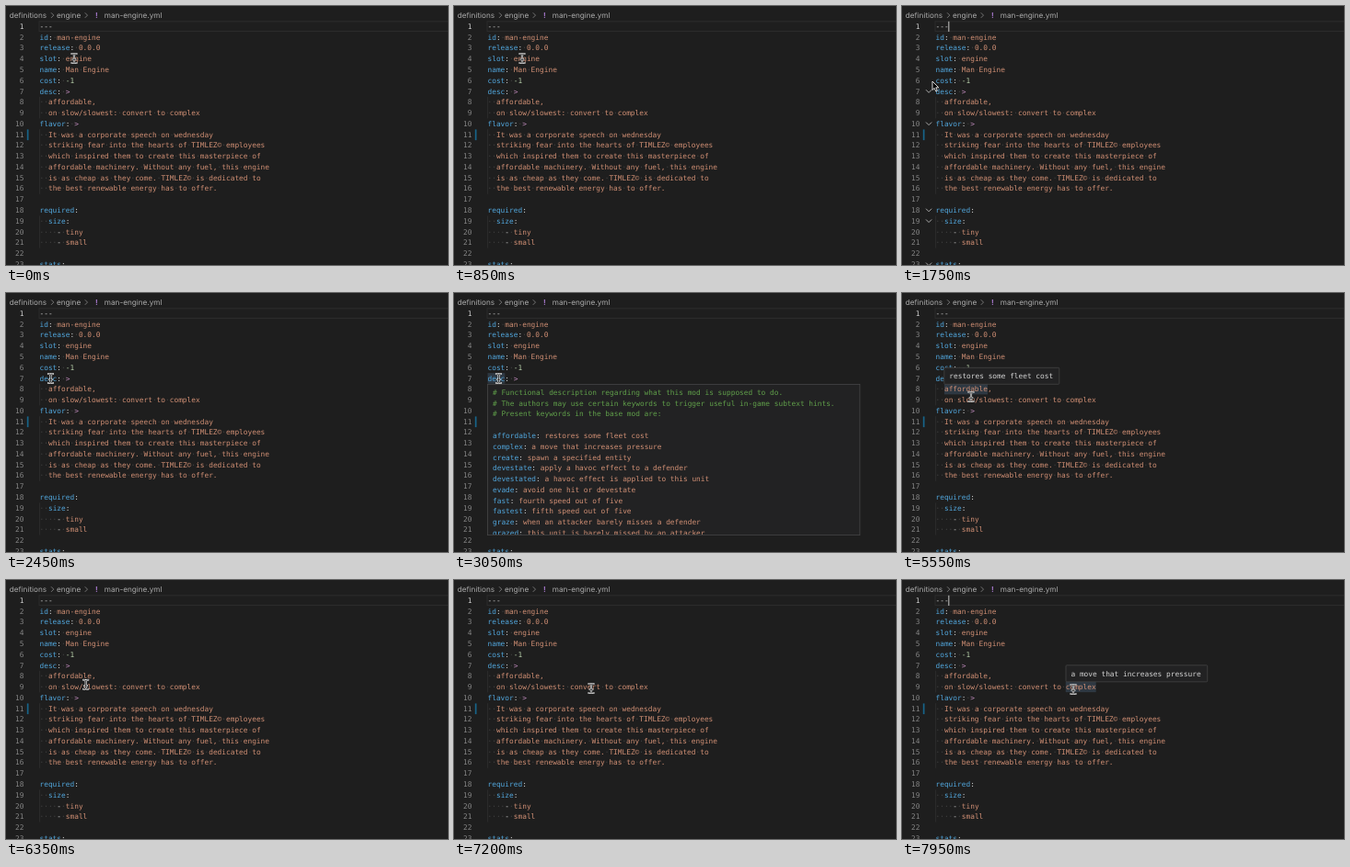
Write an HTML page that moves like this. It is 480 by 282 pixels and loops after 8000 ms.

```html
<!DOCTYPE html>
<html lang="en">
<head>
<meta charset="utf-8">
<title>Editor hover hints</title>
<style>
  html, body { margin: 0; width: 100%; height: 100%; overflow: hidden; background: #1e1e1e; }
  svg { display: block; }
  text { font: 7.82px "DejaVu Sans Mono", monospace; white-space: pre; text-rendering: geometricPrecision; }
  .crumb text { font: 8.2px Inter, sans-serif; fill: #a9a9a9; }
  .num { fill: #858585; text-anchor: end; }
  .box { fill: #222223; stroke: #454545; stroke-width: .8; }
  .mark { fill: #3a4a5a; opacity: .6; }
  .line { fill: none; stroke-linecap: round; stroke-linejoin: round; }
</style>
</head>
<body>
<svg id="stage" width="480" height="282"></svg>
<script>
const LOOP = 8000, LEFT = 36.5, CHAR = 4.708, ROW = 11.77, BASE = 24.9;
const KEY = '#51a6dc', STR = '#d08f74', NUM = '#b5cea8', PLAIN = '#d4d4d4',
      NOTE = '#609f4a', FOLD = '#c08bbd', DOT = '#444';

const source = `---
id: man-engine
release: 0.0.0
slot: engine
name: Man Engine
cost: -1
desc: >
  affordable,
  on slow/slowest: convert to complex
flavor: >
  It was a corporate speech on wednesday
  striking fear into the hearts of TIMLEZ© employees
  which inspired them to create this masterpiece of
  affordable machinery. Without any fuel, this engine
  is as cheap as they come. TIMLEZ© is dedicated to
  the best renewable energy has to offer.

required:
  size:
    - tiny
    - small

stats:`.split('\n');

const hint = `# Functional description regarding what this mod is supposed to do.
# The authors may use certain keywords to trigger useful in-game subtext hints.
# Present keywords in the base mod are:

affordable: restores some fleet cost
complex: a move that increases pressure
create: spawn a specified entity
devestate: apply a havoc effect to a defender
devestated: a havoc effect is applied to this unit
evade: avoid one hit or devestate
fast: fourth speed out of five
fastest: fifth speed out of five
graze: when an attacker barely misses a defender
grazed: this unit is barely missed by an attacker`.split('\n');

const rowY = n => BASE + (n - 1) * ROW;
const span = (s, fill) => `<tspan fill="${fill}">${s}</tspan>`;
const text = (x, y, s, attr = '') => `<text x="${x}" y="${y}" ${attr}>${s}</text>`;
const rect = (x, y, w, h, attr) => `<rect x="${x}" y="${y}" width="${w}" height="${h}" ${attr}/>`;
const path = (d, stroke, width) => `<path class="line" d="${d}" stroke="${stroke}" stroke-width="${width}"/>`;

// Splits one YAML line into [text, colour] pairs
function tokens(line) {
  let m;
  if (line === '---') return [[line, PLAIN]];
  if (line[0] === '#') return [[line, NOTE]];
  if ((m = line.match(/^(\s*\w+)(:)(.*)$/))) {
    const value = m[3].trim();
    const fill = value === '>' ? FOLD : /^-\d/.test(value) ? NUM : STR;
    return [[m[1], KEY], [m[2], PLAIN], [m[3], fill]];
  }
  if ((m = line.match(/^(\s*- )(.*)$/))) return [[m[1], PLAIN], [m[2], STR]];
  return [[line, STR]];
}

function paint(line, dots) {
  return tokens(line).map(([s, fill]) =>
    span(dots ? s.replace(/ +/g, gap => span('·'.repeat(gap.length), DOT)) : s, fill)).join('');
}

const tooltip = (id, x, y, w, s) =>
  `<g id="${id}">${rect(x, y, w, 18, 'class="box" rx="1"')}${text(x + 5.5, y + 11.7, s, `fill="${PLAIN}"`)}</g>`;

const mark = (id, row, col, len) =>
  rect(LEFT + col * CHAR, rowY(row) - 8.4, len * CHAR, 11.5, `id="${id}" class="mark"`);

const guide = (row, count) => rect(LEFT, rowY(row) - 8.4, .6, count * ROW, 'fill="#363636"');

const crumbs = `<g class="crumb">
  ${text(3.8, 13, 'definitions')}${text(55, 13, 'engine')}${text(106.8, 13, 'man-engine.yml')}
  ${text(97, 13, '!', 'style="fill:#a074c4;font-weight:700"')}
  ${path('M49.3 7.6l2.5 2.5-2.5 2.5M86 7.6l2.5 2.5-2.5 2.5', '#8a8a8a', .8)}</g>`;

const editor = source.map((line, i) =>
  text(19.4, rowY(i + 1), i + 1, `class="num"${i ? '' : ' style="fill:#d0d0d0"'}`) +
  text(LEFT, rowY(i + 1), paint(line, true))).join('');

const folds = [7, 10, 18, 19, 23].map(n =>
  path(`M26.3 ${rowY(n) - 4}l2.8 2.8 2.8-2.8`, '#b8b8b8', .9)).join('');

const beam = 'M-2.6-5Q-.2-5 0-3.8Q.2-5 2.6-5M0-3.8V3.8M-2.6 5Q-.2 5 0 3.8Q.2 5 2.6 5M-1.4 1.3H1.4';

document.getElementById('stage').innerHTML = `
  ${rect(36, 16.8, 450, 10.7, 'fill="none" stroke="#2b2b2b" stroke-width="1.1"')}
  ${crumbs}
  ${rect(22.8, rowY(11) - 8.2, 1.7, 11.7, 'fill="#176489"')}
  ${guide(8, 2)}${guide(11, 6)}${guide(19, 3)}
  ${mark('descMark', 7, 0, 4)}${mark('affordMark', 8, 2, 10)}${mark('complexMark', 9, 30, 7)}
  ${editor}
  <g id="folds">${folds}</g>
  ${rect(50.2, 16.8, 1.2, 11.2, 'id="caret" fill="#aeafad"')}
  <g id="descTip">
    ${rect(36.5, 99.4, 404.3, 164.2, 'class="box"')}
    <svg x="37" y="100" width="403" height="163">
      ${hint.map((line, i) => text(5, 10.9 + i * ROW, paint(line))).join('')}
    </svg>
  </g>
  ${tooltip('affordTip', 45.8, 81.3, 125, 'restores some fleet cost')}
  ${tooltip('complexTip', 178, 92.8, 153.7, 'a move that increases pressure')}
  <g id="beam">${path(beam, '#f2f2f2', 2.1)}${path(beam, '#111', .75)}</g>
  <path id="arrow" d="M0 0V9.4L2.2 7.4 3.7 10.9 5.3 10.2 3.8 6.8H6.8Z"
    fill="#000" stroke="#eee" stroke-width=".9" stroke-linejoin="round"/>`;

// Pointer stops: time, x, y
const stops = [
  [0, 74, 57], [1250, 74, 57], [1600, 33, 82], [1850, 33, 82], [2350, 48.5, 93],
  [4000, 48.5, 93], [4250, 78, 93], [4350, 78, 93], [4650, 75, 113], [6150, 75, 113],
  [6950, 149, 118], [7200, 149, 118], [7500, 186, 119], [LOOP, 186, 119]
];

// Visible spans: id, from, to
const spans = [
  ['descTip', 2975, 4425], ['descMark', 2975, 4150],
  ['affordTip', 4925, 6325], ['affordMark', 4925, 6325],
  ['complexTip', 7775, LOOP], ['complexMark', 7775, LOOP]
];

const get = id => document.getElementById(id);
const show = (id, on) => get(id).style.visibility = on ? 'visible' : 'hidden';
const clamp = v => Math.min(1, Math.max(0, v));

function pointer(t) {
  const i = stops.findIndex(s => s[0] > t);
  const [t0, x0, y0] = stops[i - 1], [t1, x1, y1] = stops[i];
  const u = (t - t0) / (t1 - t0), e = u * u * (3 - 2 * u);
  return [x0 + (x1 - x0) * e, y0 + (y1 - y0) * e];
}

function draw(t) {
  const [x, y] = pointer(t), inGutter = x < 36;
  for (const id of ['beam', 'arrow']) get(id).setAttribute('transform', `translate(${x} ${y})`);
  show('arrow', inGutter);
  show('beam', !inGutter);
  spans.forEach(([id, from, to]) => show(id, t >= from && t < to));
  show('caret', t >= 30 && Math.floor((t - 30) / 420) % 2 === 0);
  get('folds').style.opacity = Math.min(clamp((t - 1450) / 200), clamp((2050 - t) / 200));
}

const start = performance.now();
function frame() {
  draw((performance.now() - start) % LOOP);
  requestAnimationFrame(frame);
}
frame();
</script>
</body>
</html>
```
